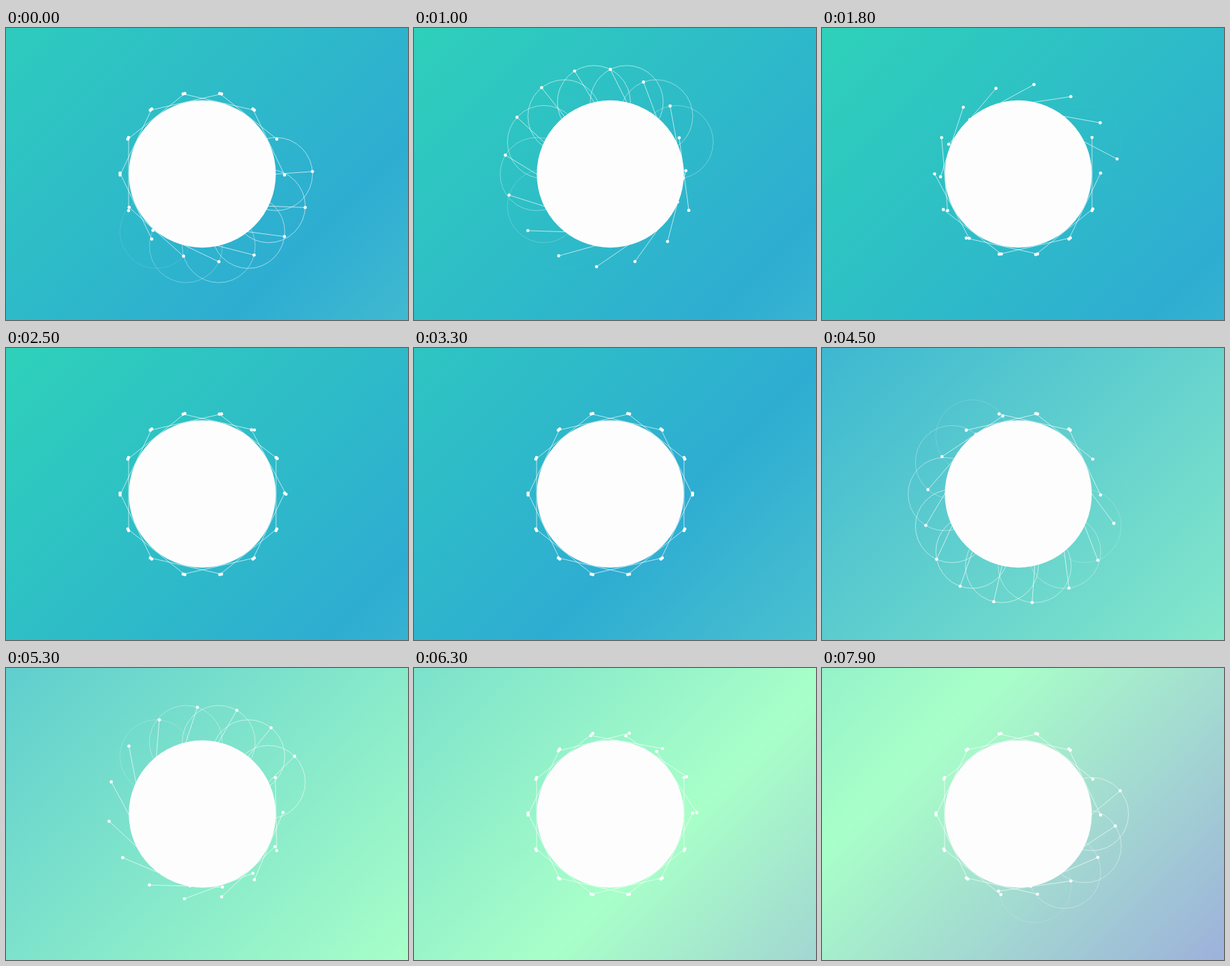
An HTML page with a canvas for the animation above (8000 ms loop, 600 px wide and 435 px high).

```html
<!DOCTYPE html>
<html lang="en">
<head>
<meta charset="utf-8">
<title>Spinning ring</title>
<style>
html, body { margin: 0; width: 100%; height: 100%; overflow: hidden; }
canvas { display: block; width: 600px; height: 435px; }
</style>
</head>
<body>
<canvas id="stage" width="600" height="435"></canvas>
<script>
const ctx = document.getElementById('stage').getContext('2d');
const LOOP = 8000, STEP = 100;
const CX = 293, CY = 217.6, RING = 110, ARM = 54.5, COUNT = 14;
const SPIN = 2000, STAGGER = 100, CYCLE = 4000;
const COLORS = ['rgb(46,242,163)', 'rgb(46,173,210)', 'rgb(168,255,200)', 'rgb(143,75,243)'];
const SPACING = 1750;

const clamp = v => Math.min(1, Math.max(0, v));

// cubic-bezier(.25, .1, .25, 1)
function ease(x) {
  if (x <= 0 || x >= 1) return clamp(x);
  const curve = (p, a, b) => 3 * (1 - p) ** 2 * p * a + 3 * (1 - p) * p * p * b + p ** 3;
  let lo = 0, hi = 1;
  for (let i = 0; i < 24; i++) {
    const mid = (lo + hi) / 2;
    if (curve(mid, 0.25, 0.25) < x) lo = mid; else hi = mid;
  }
  return curve(lo, 0.1, 1);
}

// The diagonal gradient slides back, turns, then slides forward.
function drawBackground(t) {
  const turn = 2400, length = 7800, range = 2550;
  const slide = t < turn ? 1 - ease((t - turn + length) / length) : ease((t - turn) / length);
  const blue = 930 - range * slide;
  const from = (blue - SPACING) / 2, to = (blue + 2 * SPACING) / 2;
  const gradient = ctx.createLinearGradient(from, from, to, to);
  COLORS.forEach((color, i) => gradient.addColorStop(i / 3, color));
  ctx.fillStyle = gradient;
  ctx.fillRect(0, 0, 600, 435);
}

function circle(x, y, r) {
  ctx.beginPath();
  ctx.arc(x, y, r, 0, 2 * Math.PI);
}

function drawArm(k, time) {
  const radial = k * 2 * Math.PI / COUNT;
  const x = CX + RING * Math.cos(radial), y = CY + RING * Math.sin(radial);
  const elapsed = time - k * STAGGER;
  const angle = radial - Math.PI / 2 + Math.PI * ease(elapsed / SPIN);
  const dx = ARM * Math.cos(angle), dy = ARM * Math.sin(angle);

  const glow = Math.sin(Math.PI * clamp(elapsed / 1000));
  ctx.strokeStyle = `rgba(255,255,255,${0.6 * glow})`;
  circle(x, y, ARM);
  ctx.stroke();

  ctx.strokeStyle = 'rgba(255,255,255,.68)';
  ctx.beginPath();
  ctx.moveTo(x - dx, y - dy);
  ctx.lineTo(x + dx, y + dy);
  ctx.stroke();

  ctx.fillStyle = '#fff';
  for (const side of [-1, 1]) {
    circle(x + side * dx, y + side * dy, 2.4);
    ctx.fill();
  }
}

function draw(now) {
  const t = Math.floor(now % LOOP / STEP) * STEP;
  // The first second runs slightly slower than the rest.
  const time = (t + 487 + 78 * clamp(1 - t / 1000)) % CYCLE;
  drawBackground(t);
  ctx.lineWidth = 1;
  for (let k = 0; k < COUNT; k++) drawArm(k, time);
  ctx.fillStyle = '#fefdfe';
  circle(CX, 217.5, 109.7);
  ctx.fill();
}

let start;
function tick(now) {
  start ??= now;
  draw(now - start);
  requestAnimationFrame(tick);
}
draw(0);
requestAnimationFrame(tick);
</script>
</body>
</html>
```
